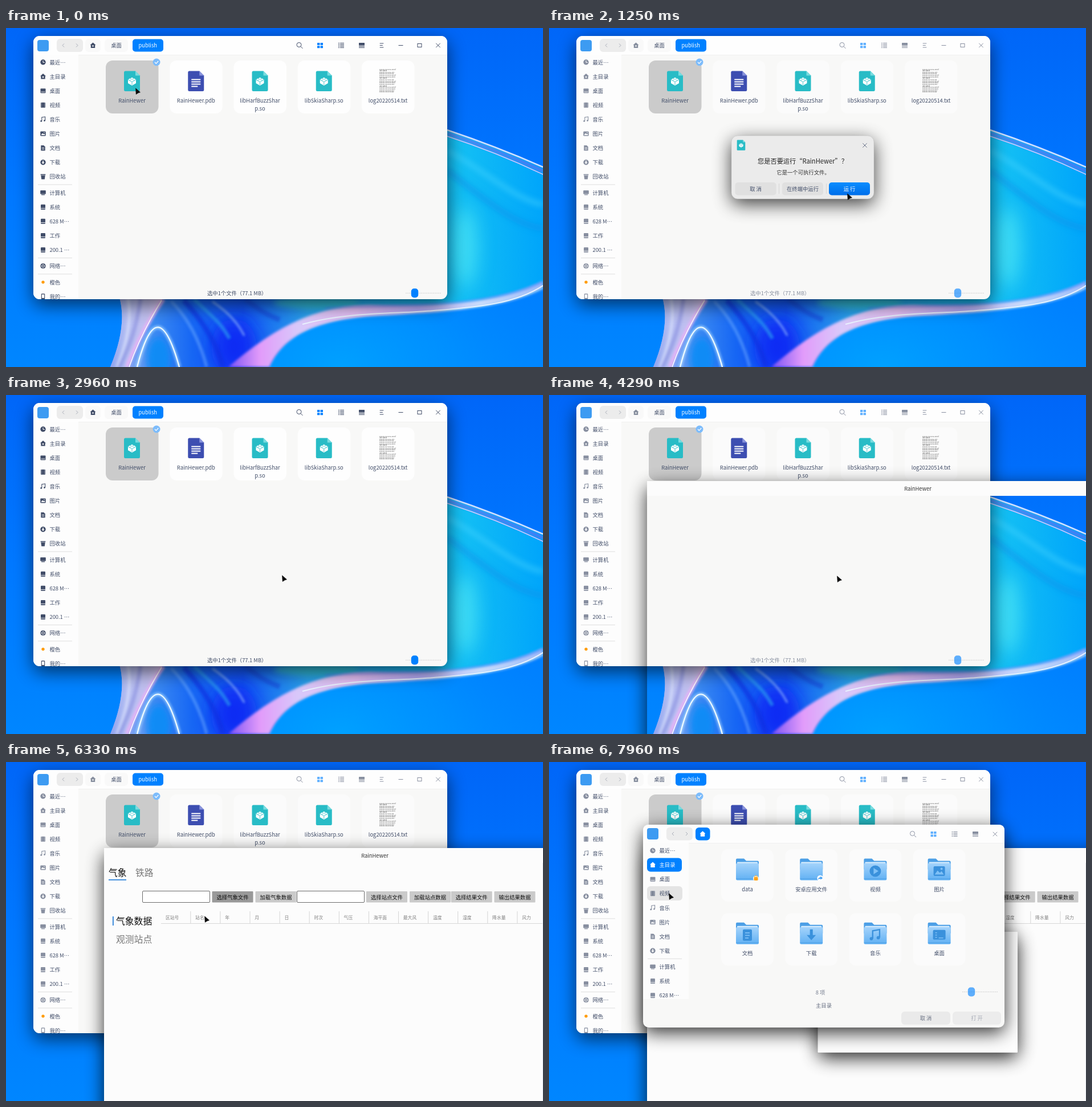
An HTML page that plays this animation: 942x595 px, repeating every 8 s.

```html
<!DOCTYPE html>
<html lang="zh-CN">
<head>
<meta charset="utf-8">
<title>RainHewer</title>
<style>
html, body { margin: 0; width: 100%; height: 100%; overflow: hidden; }
svg { display: block; width: 942px; height: 595px; }
text { font-family: "Noto Sans CJK SC", "Noto Sans CJK", "Noto Sans", sans-serif; white-space: pre; }
.inactive .icon { opacity: .62; }
.inactive .tool { opacity: .62; }
.inactive .card { opacity: .4; }
</style>
</head>
<body>
<svg id="stage" viewBox="0 0 942 595"></svg>
<script>
const INK = '#414d68', BLUE = '#0081ff', APP = 'RainHewer', LOOP = 8000;

// ---- drawing helpers
const rect = (x, y, w, h, r, fill, extra = '') =>
  `<rect x="${x}" y="${y}" width="${w}" height="${h}" rx="${r}" fill="${fill}" ${extra}/>`;
const path = (d, fill = 'none', extra = '') => `<path d="${d}" fill="${fill}" ${extra}/>`;
const line = (d, color = INK, width = 1, extra = '') =>
  path(d, 'none', `stroke="${color}" stroke-width="${width}" ${extra}`);
const circle = (x, y, r, fill, extra = '') => `<circle cx="${x}" cy="${y}" r="${r}" fill="${fill}" ${extra}/>`;
const text = (x, y, s, { size = 9.33, fill = INK, anchor = 'start', weight = 400 } = {}) =>
  `<text x="${x}" y="${y}" font-size="${size}" fill="${fill}" text-anchor="${anchor}" font-weight="${weight}">${s}</text>`;
const centered = (x, y, s, opts) => text(x, y, s, { ...opts, anchor: 'middle' });
const group = (content, attrs = '') => `<g ${attrs}>${content}</g>`;
const at = (x, y, content, attrs = '') => group(content, `transform="translate(${x} ${y})" ${attrs}`);
const shadow = (x, y, w, h, opacity, dy = 9) =>
  rect(x, y + dy, w, h, 12, '#000', `opacity="${opacity}" filter="url(#blur16)"`);
const gradient = (id, coords, stops, type = 'linear') => `<${type}Gradient id="${id}" ${coords}>` +
  stops.map(([o, c, a = 1]) => `<stop offset="${o}" stop-color="${c}" stop-opacity="${a}"/>`).join('') + `</${type}Gradient>`;
const blur = s => `<filter id="blur${s}" filterUnits="userSpaceOnUse" x="-80" y="-80" width="1300" height="900">` +
  `<feGaussianBlur stdDeviation="${s}"/></filter>`;

// ---- small icons, centred on the origin
const disk = c => rect(-4, -4.5, 8, 9, 1.2, c) + line('M-4 2.2H4', '#fff', .9);
const glyphs = {
  clock: c => circle(0, 0, 4.7, c) + line('M0-3V.5H2.8', '#fff', 1),
  home: c => path('M0-5L5-.5H3.7V4.5H-3.7V-.5H-5Z', c) + circle(0, 1, 1.3, '#fff'),
  desktop: c => rect(-4.5, -4, 9, 8, 1, c) + line('M-3.5 2H3.5', '#fff', .9),
  film: c => rect(-4, -4.5, 8, 9, 1, c) + line('M-2.7-4V4M2.7-4V4', '#fff', .8, 'stroke-dasharray="1 1"'),
  music: c => line('M-2.2 3V-3.6L3.6-4.6V2', c, 1.1) + circle(-3.3, 3, 1.4, c) + circle(2.5, 2.2, 1.4, c),
  picture: c => rect(-4.7, -4, 9.4, 8, 1.2, c) + path('M-3.5 2.5L-1-1L.6 1L2-.3L3.7 2.5Z', '#fff') + circle(2, -2, .8, '#fff'),
  doc: c => path('M-3.7-4.7H1.2L3.7-2.2V4.7H-3.7Z', c) + line('M-2-.5H2M-2 2H2', '#fff', .9),
  down: c => circle(0, 0, 4.7, c) + path('M-.8-3H.8V0H2.6L0 3L-2.6 0H-.8Z', '#fff'),
  trash: c => path('M-4.3-4.4H4.3V-2.8H3.8L2.8 4.6H-2.8L-3.8-2.8H-4.3Z', c) + line('M-3.6-2.4H3.6', '#fff', .6),
  computer: c => rect(-4.8, -4, 9.6, 6.4, 1, c) + rect(-3, 3, 6, 1.2, 0, c),
  disk,
  net: c => circle(0, 0, 4.7, c) + line('M-4 0H4M0-4L2.5 0L0 4L-2.5 0Z', '#fff', .7),
  dot: () => circle(0, 0, 2.7, '#ff9c0a'),
  phone: c => rect(-3.2, -5, 6.4, 10, 1.2, c) + rect(-2.1, -3.6, 4.2, 6.3, 0, '#fff'),
};
const icon = (name, x, y, color = INK) => at(x, y, glyphs[name](color), name === 'dot' ? '' : 'class="icon"');

const tools = {
  search: circle(-1, -1, 4, 'none', `stroke="${INK}"`) + line('M2 2L5.5 5.5'),
  grid: [[-5, -4.5], [.6, -4.5], [-5, .7], [.6, .7]].map(([x, y]) => rect(x, y, 4.4, 4, .5, BLUE)).join(''),
  list: line('M-5-4H-3M-5-1.3H-3M-5 1.3H-3M-5 4H-3M-2-4H5M-2-1.3H5M-2 1.3H5M-2 4H5', INK, 1.2),
  detail: rect(-5, -4.5, 10, 4.6, .5, INK) + line('M-5 1.6H5M-5 4H5', INK, 1.2),
  menu: line('M-3.3-3.5H3.3M-3.3 0H1.8M-3.3 3.5H3.3'),
  min: line('M-4 0H4'),
  max: rect(-3.5, -3, 7, 6, 0, 'none', `stroke="${INK}"`),
  close: line('M-3.7-3.7L3.7 3.7M3.7-3.7L-3.7 3.7'),
};
const toolbar = (y, entries) => entries.map(([name, x]) => at(x, y, tools[name], 'class="tool"')).join('');
const navigation = (x, y) => rect(x, y - 11.5, 46, 23, 6, '#ececec') +
  line(`M${x + 13} ${y - 3}l-3 3l3 3M${x + 34} ${y - 3}l3 3l-3 3`, '#a8adb8');
const appBadge = (x, y) => rect(x - 10, y - 10, 20, 20, 4, '#3d9bf2');
const slider = (x, y) => line(`M${x - 16} ${y}H${x + 46}`, '#d2d2d2', 1, 'stroke-dasharray="2 1"') +
  rect(x - 6.2, y - 8, 12.4, 16, 5, BLUE, 'class="tool"');

// ---- file and folder icons
const cube = path('M0-6L7-2.5V4L0 8L-7 4V-2.5Z', '#fff') + line('M-6.5-1.8L0 1.5L6.5-1.8M0 1.5V7', '#28bcc6', .8) +
  [[0, -4.6], [-3.7, -2.7], [3.7, -2.7]].map(([x, y]) =>
    `<ellipse cx="${x}" cy="${y}" rx="2.1" ry="1.7" fill="#fff" stroke="#28bcc6" stroke-width=".5"/>`).join('');
const sheet = (color, fold, content) =>
  path('M-11.5-17.5H6L14-9.5V15.5Q14 18 11.5 18H-11.5Q-14 18-14 15.5V-15Q-14-17.5-11.5-17.5Z', color) +
  path('M6-17.5V-9.5H14Z', fold) + content;
const fileIcons = {
  program: sheet('#28bcc6', '#78dce0', cube),
  document: sheet('#3d4eb1', '#8792dc', line('M-8-2.5H8M-8 1.5H8M-8 5.5H8M-8 9.5H3', '#fff', 2)),
  log: Array.from({ length: 16 }, (_, i) => text(-15, -19.5 + i * 2.65,
    i % 5 === 1 ? 'INFO started' : `2022-05-14 ${10 + i}:20:36.${i * 37 + 105} info`.slice(0, 27 - i % 4),
    { size: 2.25, fill: '#333' })).join(''),
};
const folderMarks = {
  lock: circle(15, 16, 5, '#fff') + rect(11.5, 13.5, 7, 6, 1.5, '#ffa21a') + line('M13 14V12.5Q15 9.5 17 12.5V14', '#ffa21a', 1.2),
  link: circle(15.5, 15.5, 5.3, '#fff') + path('M12 18Q12 14 16 14V12L20 15.3L16 18V16Q13.5 16 12 18Z', '#3c9cf2'),
  play: circle(0, 3, 10, '#3a91dc') + path('M-3-2.5L5.5 3L-3 8.5Z', '#7fc0f6'),
  picture: rect(-10, -5.5, 20, 17, 2, '#3a91dc') + path('M-8 9L-3 2L1 6L4 3L8 9Z', '#7fc0f6') + circle(4, -1, 2, '#7fc0f6'),
  doc: rect(-8, -7, 16, 20, 2, '#3a91dc') + line('M-4-1H4M-4 3.5H4M-4 8H2', '#7fc0f6', 1.7),
  down: path('M-2.5-7H2.5V3H8L0 12L-8 3H-2.5Z', '#3a91dc'),
  music: at(0, 3, group(glyphs.music('#3a91dc'), 'transform="scale(2.1)"')),
  desktop: rect(-11, -6, 22, 17, 2, '#3a91dc') + line('M-7-1H-4M-7 3H-4M-7 7H-4M-1 8H7', '#7fc0f6', 1.6),
};
const folder = mark => path('M-20-17Q-20-19-18-19H-6L-2-15H18Q20-15 20-13V0H-20Z', '#4c9fe6') +
  rect(-18, -13, 36, 12, 1, '#d9eefe') + rect(-20, -11, 40, 30, 2.5, 'url(#folder)') +
  line('M-19.5 16.5H19.5', '#4d9fe5', 1) + (folderMarks[mark] || '');

// ---- sidebars
const places = [['clock', '最近…'], ['home', '主目录'], ['desktop', '桌面'], ['film', '视频'], ['music', '音乐'],
  ['picture', '图片'], ['doc', '文档'], ['down', '下载'], ['trash', '回收站'], null, ['computer', '计算机'],
  ['disk', '系统'], ['disk', '628 M…'], ['disk', '工作'], ['disk', '200.1 …'], null, ['net', '网络…'], null,
  ['dot', '橙色'], ['phone', '我的…']];
const sidebar = (x, top, rows, selected) => {
  let y = top;
  return rows.map(row => {
    if (!row) { y += 3.2; return line(`M${x + 8} ${y - 14.2}h60`, '#dedede', 1); }
    const on = row[1] === selected, color = on ? '#fff' : INK;
    const out = (on ? rect(x + 7, y - 12, 61, 24, 6, BLUE) : '') +
      (on ? at(x + 17, y, glyphs[row[0]](color)) : icon(row[0], x + 17, y)) +
      text(x + 28.5, y + 3.6, row[1], { fill: color });
    y += 25.1;
    return out;
  }).join('');
};

// ---- scene parts
const streak = (d, color, width, opacity, soft = 'blur2') => line(d, color, width, `opacity="${opacity}" filter="url(#${soft})"`);
const glow = (x, y, rx, ry, color, opacity, soft = 'blur16') =>
  `<ellipse cx="${x}" cy="${y}" rx="${rx}" ry="${ry}" fill="${color}" opacity="${opacity}" filter="url(#${soft})"/>`;
const leftEdge = 'M198 470Q214 520 183 595';
const outerEdge = 'C484 545 535 514 640 506C760 499 870 494 942 458';
const wallpaper = rect(0, 0, 942, 595, 0, 'url(#sky)') + rect(0, 0, 942, 595, 0, 'url(#skyGlow)') +
  path(leftEdge + 'H462' + outerEdge + 'V243L774 178L700 300Z', 'url(#silk)') +
  group(
    glow(400, 560, 40, 50, '#0a1cf4', .75) + glow(805, 385, 22, 70, '#58ecf4', .65) +
    glow(545, 482, 75, 10, '#35c4cf', .7, 'blur5') + glow(268, 580, 20, 36, '#0a8cf6', .9, 'blur5') +
    streak('M774 215C840 250 890 300 942 310', '#45d4ff', 10, .45, 'blur5') +
    streak('M774 250C840 300 890 345 942 352', '#0792ea', 12, .5, 'blur5') +
    streak('M290 480C320 510 340 550 352 595', '#66a8ff', 5, .6) +
    streak('M312 478C350 520 372 560 380 595', '#0a2ee0', 9, .6) +
    streak('M330 476C365 510 375 515 392 545', '#2a9af0', 6, .7) +
    streak('M362 480C392 500 408 520 418 540', '#a6ccff', 3, .7) +
    streak('M420 476C450 500 462 505 480 512', '#1648d8', 9, .6), 'clip-path="url(#silkClip)"') +
  path(leftEdge + 'H214Q238 530 278 470Z', 'url(#veil)') +
  streak('M236 474Q228 540 198 595', '#8b92e0', 7, .6) +
  streak('M214 474Q224 525 194 595', '#e6ecff', 4, .6) +
  path('M462 595' + outerEdge + 'V444C870 480 770 489 640 486C540 487 470 527 390 595Z', 'url(#ribbon)', 'filter="url(#blur2)"') +
  line('M520 520C600 498 680 502 750 496S890 486 942 452', '#e9f2ff', 2) +
  streak('M560 492C680 484 840 494 942 446', '#5a72ff', 2, .7) +
  streak('M276 476Q238 530 212 595', '#e6b2f6', 7, .9) +
  line('M273 478Q236 538 216 595', '#fff', 1.5) +
  streak('M230 595C254 502 278 502 304 595', '#a9d8ff', 6, .8) +
  line('M230 595C254 502 278 502 304 595', '#f2fdff', 2.2) +
  line('M774 179Q860 208 942 244', '#d7e6ff', 2.5) +
  streak('M774 185Q860 214 942 251', '#6c62f2', 5, .8) +
  line('M774 190Q860 218 942 257', '#d9c6ff', 1.5);

const fileCards = [['program', APP], ['document', APP + '.pdb'], ['program', 'libHarfBuzzShar', 'p.so'],
  ['program', 'libSkiaSharp.so'], ['log', 'log20220514.txt']].map(([kind, name, rest = ''], i) => {
  const x = 175 + i * 112.25;
  return (i ? rect(x, 57, 92.5, 93, 12, '#fefefe', 'class="card"') : rect(x, 57, 92.5, 93, 12, '#cbcbcb')) +
    at(x + 46, 93, fileIcons[kind]) + centered(x + 46, 131, name) + centered(x + 46, 145, rest);
}).join('');

const fileManager = shadow(48, 14, 726, 462, .6, 10) + group(
  rect(48, 14, 726, 462, 0, '#f8f8f7') + rect(48, 14, 726, 33, 0, '#fefefe') + rect(48, 47, 79, 429, 0, '#fdfdfd') +
  line('M127 47.5H774', '#f0f0f0') + appBadge(65, 31) + navigation(89, 30.5) +
  rect(139, 19, 27, 23, 6, '#f9f9f9') + icon('home', 152.5, 30.5) + rect(173, 19, 41, 23, 6, '#f9f9f9') +
  centered(193.5, 34.2, '桌面') + rect(222, 19.5, 54, 22, 5, BLUE) +
  centered(248.7, 34.2, 'publish', { fill: '#fff', weight: 500 }) +
  toolbar(30.5, [['search', 515], ['grid', 551], ['list', 588], ['detail', 624], ['menu', 659],
    ['min', 692.5], ['max', 725.5], ['close', 758]]) +
  sidebar(48, 60, places) + fileCards +
  circle(264, 60, 6.5, '#7dbcfb') + line('M261 60L263.3 62.3L267.3 58', '#fff', 1.2) +
  group(text(353, 469.3, '选中1个文件（77.1 MB）'), 'class="tool"') + slider(717, 465.3),
  'clip-path="url(#managerClip)"');

const dialogButton = (x, label, main) => rect(x, 271, 72, 22.5, 5, main ? 'url(#mainButton)' : '#e0e0e0') +
  centered(x + 36, 285.8, label, { fill: main ? '#fff' : INK, weight: main ? 500 : 400 });
const runDialog = shadow(320, 189, 250, 111, .75) +
  rect(320, 189, 250, 111, 11, '#ebebeb', 'stroke="#bbb" stroke-width=".5"') +
  at(337, 205.5, group(fileIcons.program, 'transform="scale(.52)"')) +
  at(554, 206, tools.close, 'opacity=".75"') +
  centered(445, 238, `您是否要运行“${APP}”？`, { size: 11.2, fill: '#222', weight: 500 }) +
  centered(446, 257, '它是一个可执行文件。', { fill: '#333' }) +
  dialogButton(326.5, '取 消') + dialogButton(409, '在终端中运行') + dialogButton(491, '运 行', true) +
  line('M403.5 273V291M486.5 273V291', '#d6d6d6');

const appFrame = group(shadow(172, 151, 950, 600, .8, 10), 'clip-path="url(#outsideApp)"') +
  rect(172, 151, 950, 26, 0, '#fcfcfc') + centered(647, 167.6, APP, { fill: '#333' });
const pushButton = (x, label, attrs = '') => rect(x, 227, 72, 19.5, 1, '#cacaca', attrs) + centered(x + 36, 240.8, label, { fill: '#111' });
const field = x => rect(x + .5, 226.5, 118, 20, 1.5, '#fff', 'stroke="#6c6c6c"');
const columns = ['区站号', '站名', '年', '月', '日', '时次', '气压', '海平面', '最大风', '温度', '湿度', '降水量', '风力'];
const appContent = rect(172, 177, 770, 418, 0, '#fcfcfc') +
  text(180, 199.5, '气象', { size: 15.7, fill: '#111' }) + text(227, 199.5, '铁路', { size: 15.7, fill: '#777' }) +
  rect(180, 206, 31, 1.6, 0, '#1f7ad6') + field(239) + field(510) +
  pushButton(361.5, '选择气象文件', 'id="pick"') +
  [[437.5, '加载气象数据'], [632, '选择站点文件'], [708, '加载站点数据'], [780.7, '选择结果文件'], [856.5, '输出结果数据']]
    .map(([x, s]) => pushButton(x, s)).join('') +
  rect(187, 271, 1.7, 16, 0, '#1f7ad6') + text(193, 285.2, '气象数据', { size: 15.8, fill: '#111' }) +
  text(193, 316.8, '观测站点', { size: 15.8, fill: '#777' }) +
  columns.map((s, i) => text(280 + i * 52.1, 276, s, { size: 7.8, fill: '#808080' }) +
    (i ? line(`M${271.7 + i * 52.1} 262V284`, '#d5d5d5') : '')).join('') +
  line('M272 283.5H942', '#d8d8d8') + line('M941.5 177V595', '#e4e8ee');

const folders = [['lock', 'data'], ['link', '安卓应用文件'], ['play', '视频'], ['picture', '图片'],
  ['doc', '文档'], ['down', '下载'], ['music', '音乐'], ['desktop', '桌面']].map(([mark, name], i) => {
  const x = 302 + i % 4 * 112.2, y = 153 + Math.floor(i / 4) * 112.3;
  return rect(x, y, 92, 92, 12, '#fefefe', 'class="card"') + at(x + 46, y + 35.5, folder(mark)) + centered(x + 46, y + 73.8, name);
}).join('');

const chooserPlaces = [...places.slice(0, 8), null, ...places.slice(10, 13)];
const chooser = shadow(165, 110, 634, 356, .8) +
  rect(165, 110, 634, 356, 10, '#f8f8f7') + path('M165 142V120Q165 110 175 110H789Q799 110 799 120V142Z', '#fdfdfd') +
  rect(165, 142, 80, 274, 0, '#fcfcfc') + line('M245 142.5H799', '#f0f0f0') +
  appBadge(182, 126) + navigation(206, 126) +
  rect(257, 115, 25.5, 22.5, 6, BLUE) + at(269.5, 126.3, glyphs.home('#fff')) +
  toolbar(126.5, [['search', 638.5], ['grid', 674.5], ['list', 711.5], ['detail', 748], ['close', 782.5]]) +
  rect(172, 218, 62, 25, 6, '#e4e4e4', 'id="hover"') +
  sidebar(165, 155.5, chooserPlaces, '主目录') + folders +
  centered(476, 407.5, '8 项', { fill: '#777f90' }) + centered(482, 430.5, '主目录', { fill: '#666e80' }) + slider(741, 403.5) +
  rect(618, 438, 86, 23, 6, '#eaeaea') + centered(661, 453, '取 消', { fill: '#687082' }) +
  rect(708, 438, 85, 23, 6, '#ececec') + centered(750.5, 453, '打 开', { fill: '#a5aab5' });

const blankWindow = shadow(472, 298, 350, 212, .85) + rect(471.5, 298, 350.5, 212, 1, '#fdfdfd');

const defs = '<defs>' + [16, 5, 2].map(blur).join('') +
  gradient('sky', 'x1="0" y1="0" x2="0" y2="1"', [[0, '#0066f8'], [.5, '#0078ff'], [1, '#0086ff']]) +
  gradient('skyGlow', 'cx=".62" cy="1" r=".4"', [[0, '#00a4ff', .9], [.5, '#009cff', .5], [1, '#008cff', 0]], 'radial') +
  gradient('silk', 'gradientUnits="userSpaceOnUse" x1="190" y1="0" x2="942" y2="0"',
    [[0, '#a9b4f4'], [.09, '#3d8cf2'], [.18, '#1767f4'], [.3, '#1356f4'], [.45, '#28a0ea'], [.8, '#14c0f4'], [1, '#00a5fb']]) +
  gradient('veil', 'x1="0" y1="0" x2="1" y2="0"', [[0, '#8fa4f0'], [.3, '#b4bef2'], [.7, '#c3c0f0'], [1, '#e4cdf6']]) +
  gradient('ribbon', 'gradientUnits="userSpaceOnUse" x1="390" y1="0" x2="942" y2="0"',
    [[0, '#7b52f5'], [.1, '#e29bfa'], [.22, '#d8c8fa'], [.4, '#e5c0f5'], [.6, '#b3a9f4'], [.8, '#c9dcfb'], [1, '#9ebcf8']]) +
  gradient('folder', 'x1="0" y1="0" x2="0" y2="1"', [[0, '#a4d3fb'], [1, '#60b0f3']]) +
  gradient('mainButton', 'x1="0" y1="0" x2="0" y2="1"', [[0, '#0a8dff'], [1, '#006eea']]) +
  `<clipPath id="managerClip">${rect(48, 14, 726, 462, 11, '#fff')}</clipPath>
   <clipPath id="silkClip">${path(leftEdge + 'H462' + outerEdge + 'V243L774 178L700 300Z')}</clipPath>
   <clipPath id="outsideApp">${path('M0 0H942V151H172V595H0Z')}</clipPath></defs>`;

const layers = { manager: fileManager, runDialog, appFrame, appContent, blankWindow, chooser };
document.getElementById('stage').innerHTML = defs + wallpaper +
  Object.entries(layers).map(([id, content]) => group(content, `id="${id}" ${id === 'chooser' ? 'class="inactive"' : ''}`)).join('') +
  group(path('M.5.8L8.5 7.8Q5 8.4 1.2 11.4Z', '#0a0a0a', 'stroke="#111" stroke-width=".6" stroke-linejoin="round"'), 'id="cursor"');

// ---- timeline: [ms, x, y] of the pointer tip
const pointer = [[0, 227, 105], [500, 227, 105], [1150, 523, 290], [1650, 523, 290], [2300, 484, 316], [3400, 484, 316],
  [4100, 505, 317], [4400, 505, 317], [4870, 360, 258], [5200, 390, 239], [5700, 390, 239], [6300, 348, 270],
  [7000, 348, 270], [7750, 210, 230], [LOOP, 210, 230]];
const pointerAt = t => {
  const i = pointer.findIndex(p => p[0] > t);
  const [t0, x0, y0] = pointer[i - 1], [t1, x1, y1] = pointer[i];
  const k = (t - t0) / (t1 - t0), e = k * k * (3 - 2 * k);
  return [x0 + (x1 - x0) * e, y0 + (y1 - y0) * e];
};
const spans = { runDialog: [520, 1700], appFrame: [3900, LOOP], appContent: [4500, LOOP], blankWindow: [6700, LOOP], chooser: [6850, LOOP] };
const el = id => document.getElementById(id);
const within = (t, [from, to]) => t >= from && t < to;

function draw() {
  const t = performance.now() % LOOP, [x, y] = pointerAt(t);
  for (const id in spans) el(id).style.display = within(t, spans[id]) ? '' : 'none';
  el('manager').classList.toggle('inactive', within(t, spans.runDialog) || within(t, spans.appFrame));
  el('pick').setAttribute('fill', t > 5120 ? '#999' : '#cacaca');
  el('hover').style.display = x < 235 ? '' : 'none';
  el('cursor').setAttribute('transform', `translate(${x} ${y})`);
  requestAnimationFrame(draw);
}
draw();
</script>
</body>
</html>
```
